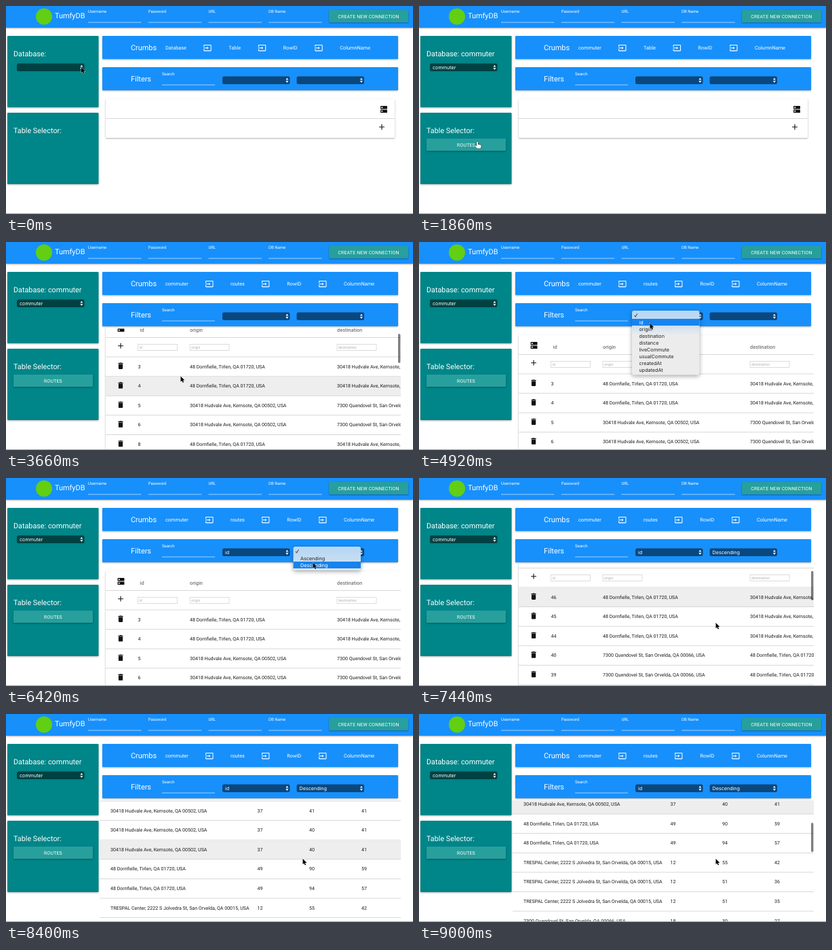
Write an HTML page that moves like this. It is 600 by 306 pixels and loops after 9060 ms.

```html
<!DOCTYPE html>
<html lang="en">
<head>
<meta charset="utf-8">
<title>Database browser</title>
<style>
  html, body { margin: 0; width: 100%; height: 100%; overflow: hidden; background: #fff; }
  svg { display: block; width: 100%; height: 100%; font-family: Roboto, sans-serif; text-rendering: geometricPrecision; }
  .card { filter: drop-shadow(0 1px 1px rgba(0, 0, 0, .32)); }
  .menu { filter: drop-shadow(0 2px 3px rgba(0, 0, 0, .35)); }
  .ui { font: 7.2px Inter, sans-serif; }
  .btn { font-size: 6.9px; letter-spacing: .2px; }
</style>
</head>
<body>
<svg id="stage" viewBox="0 0 600 306" xmlns="http://www.w3.org/2000/svg"></svg>
<script>
const LOOP = 9060, STEP = 60;
const BLUE = '#1790fc', TEAL = '#008588', BUTTON = '#279f9c';
const ROW_TOP = 194, ROW_HEIGHT = 28.6;

const ICONS = {
  enter: 'M21 3H3c-1.1 0-2 .9-2 2v4h2V5h18v14H3v-4H1v4c0 1.1.9 2 2 2h18c1.1 0 2-.9 2-2V5c0-1.1-.9-2-2-2zM11 16l4-4-4-4v3H1v2h10z',
  server: 'M4 3h16q1 0 1 1v6q0 1-1 1H4q-1 0-1-1V4q0-1 1-1zM4 13h16q1 0 1 1v6q0 1-1 1H4q-1 0-1-1v-6q0-1 1-1zM7 5a2 2 0 100 4 2 2 0 000-4zM7 15a2 2 0 100 4 2 2 0 000-4z',
  add: 'M19 13h-6v6h-2v-6H5v-2h6V5h2v6h6z',
  trash: 'M6 19c0 1.1.9 2 2 2h8c1.1 0 2-.9 2-2V7H6zM19 4h-3.5l-1-1h-5l-1 1H5v2h14z'
};
const ARROW = 'M0 0V8.2L1.9 6.5 3.2 9.4 4.6 8.8 3.3 6H5.9Z';
const HAND = 'M-1 .5Q0-.8 1 .5V3.5L5 4.4Q6 5 5.6 7L4.8 9.5H-.5L-3.6 6Q-3.5 4.6-2.2 5.2L-1 6.2Z';

const PLACES = {
  d: '48 Dornfielle, Tirlen, QA 01720, USA',
  h: '30418 Hudvale Ave, Kernsote, QA 00502, USA',
  q: '7300 Quendovel St, San Orvelda, QA 00066, USA',
  t: 'TRESPAL Center, 2222 S Jolvedra St, San Orvelda, QA 00015, USA'
};
// id, origin and destination keys, distance, live and usual commute
const parseRows = text => text.split(';').map(row => row.split(' '));
const ASCENDING = parseRows('3 dh 37 41 40;4 dh 37 42 40;5 hq 18 30 27;6 hq 18 31 27;8 dh 37 40 41;9 dh 37 43 41;10 hd 37 44 42');
const DESCENDING = parseRows('46 dh 37 41 41;45 dh 37 40 41;44 dh 37 40 41;40 qd 49 90 59;39 qd 49 94 57;38 qt 12 55 42;37 qt 12 51 36;36 qt 12 51 35;35 hq 18 30 27;34 hq 18 31 27');
const COLUMNS = { id: 194.5, origin: 271, destination: 488, distance: 704.5, liveCommute: 781, usualCommute: 858, createdAt: 935, updatedAt: 1012 };

// Keyframes: time, then values
const CURSOR = [
  [0, 111, 90], [300, 111, 90], [660, 62, 99], [1020, 62, 99], [1680, 86, 200], [2220, 86, 200],
  [2820, 257.5, 197.5], [3900, 257.5, 197.5], [4500, 352, 108], [4680, 352, 108], [4860, 340.5, 119.5],
  [5340, 340.5, 119.5], [5820, 470, 108], [6000, 470, 108], [6360, 452.5, 124.5], [6780, 452.5, 124.5], [7200, 437.5, 213]
];
const SCROLL_Y = [[3000, 0], [3300, 50], [3420, 50], [3900, 0], [7260, 0], [7620, 66], [8640, 66], [9000, 132.7]];
const SCROLL_X = [[7680, 0], [8378, 334]];
const BAR_ALPHA = [[2940, 0], [3060, .5], [3900, .5], [4140, 0], [7200, 0], [7320, .5], [7620, .5], [7920, .08], [8100, 0], [8580, 0], [8700, .5]];
const HOVER = [[0, -1], [2520, 0], [3360, 1], [3960, 0], [4140, -1], [7080, 0], [8400, 2]];

function track(keys, t) {
  const next = keys.findIndex(key => key[0] > t);
  if (next < 0) return keys[keys.length - 1].slice(1);
  if (next === 0) return keys[0].slice(1);
  const from = keys[next - 1], to = keys[next];
  const u = (t - from[0]) / (to[0] - from[0]), ease = u * u * (3 - 2 * u);
  return from.slice(1).map((value, i) => value + (to[i + 1] - value) * ease);
}
const stepAt = (keys, t) => keys.filter(key => key[0] <= t).pop()[1];

const rect = (x, y, w, h, fill, extra = '') => `<rect x="${x}" y="${y}" width="${w}" height="${h}" fill="${fill}" ${extra}/>`;
const text = (x, y, size, value, fill = '#fff', extra = '') => `<text x="${x}" y="${y}" font-size="${size}" fill="${fill}" ${extra}>${value}</text>`;
const uiText = (x, y, value, fill) => `<text class="ui" x="${x}" y="${y}" fill="${fill}">${value}</text>`;
const icon = (name, cx, cy, scale, fill = '#111') =>
  `<path fill="${fill}" fill-rule="evenodd" d="${ICONS[name]}" transform="translate(${cx} ${cy}) scale(${scale}) translate(-12 -12)"/>`;
const card = (x, y, w, h, fill) => rect(x, y, w, h, fill, 'rx="1" class="card"');

function button(x, y, w, label) {
  return card(x, y, w, 18, BUTTON) +
    `<text class="btn" x="${x + w / 2}" y="${y + 11.5}" fill="#fff" text-anchor="middle">${label}</text>`;
}

function field(x, y, w, label) {
  return text(x, y, 6, label) + rect(x, y + 14.2, w, .7, '#d8ecff');
}

function select(x, y, value) {
  return rect(x, y, 99.5, 11.5, 'rgba(0,0,0,.5)', 'rx="2.5"') + uiText(x + 4, y + 8.4, value, '#fff') +
    `<path fill="#fff" d="M${x + 93.4} ${y + 5}l2-2.8 2 2.8zM${x + 93.4} ${y + 6.6}l2 2.8 2-2.8z"/>`;
}

function menu(x, y, items, active, fill) {
  const rows = items.map((item, i) => {
    const top = y + 12 + i * 10, on = i === active;
    return (on ? rect(x, top, 99.5, 10, '#1683ee') : '') + uiText(x + 10.5, top + 7.6, item, on ? '#fff' : '#222');
  });
  return `<g>${rect(x, y, 99.5, 14.5 + items.length * 10, fill, 'rx="3" class="menu"')}` +
    `<path d="M${x + 3.5} ${y + 7}l1.5 2.2 2.8-4.8" fill="none" stroke="#222" stroke-width=".9"/>${rows.join('')}</g>`;
}

function table(rows, hover, sx, sy) {
  const line = y => rect(147, y - .4, 940, .8, '#cfcfcf');
  let out = rect(147, 137, 940, 900, '#fff', 'class="card"') + line(165.4) + line(ROW_TOP) +
    icon('server', 169.5, 152, .55) + icon('add', 169, 177.7, .56);
  for (const [name, x] of Object.entries(COLUMNS)) {
    out += text(name === 'id' ? 197.5 : x, 157.3, 7.4, name, '#757575', 'font-weight="500"') +
      rect(x, 175.5, 58, 9, '#fff', 'stroke="#d4d4d4" stroke-width=".8"') + text(x + 2, 182, 5.4, name, '#b0b0b0');
  }
  rows.forEach(([id, route, ...numbers], i) => {
    const y = ROW_TOP + i * ROW_HEIGHT, cells = [id, PLACES[route[0]], PLACES[route[1]], ...numbers];
    const xs = Object.values(COLUMNS);
    if (i === hover) out += rect(147, y, 940, ROW_HEIGHT, '#eee');
    out += line(y + ROW_HEIGHT) + icon('trash', 169, y + 13.2, .52) +
      cells.map((cell, c) => text(xs[c], y + 16.5, 7.07, cell, '#1c1c1c')).join('');
  });
  return `<g clip-path="url(#view)"><g transform="translate(${-sx} ${-sy})">${out}</g></g>`;
}

function emptyTable() {
  return card(147, 137, 426, 57, '#fff') + rect(147, 165, 426, .8, '#cfcfcf') +
    icon('server', 557, 152, .55) + icon('add', 554, 178, .56);
}

function crumbs(connected, loaded) {
  const first = connected ? 2.8 : 0, second = first + (loaded ? 3 : 0);
  const label = (x, value) => text(x, 63.7, 7.35, value);
  const arrow = x => icon('enter', x, 61.7, .52, '#fff');
  return card(142, 44, 436, 34, BLUE) + text(184, 65, 10.9, 'Crumbs') +
    label(235, connected ? 'commuter' : 'Database') + arrow(297 + first) +
    label(328.3 + first, loaded ? 'routes' : 'Table') + arrow(377.5 + second - (loaded ? .6 : 0)) +
    label(408.5 + second, 'RowID') + arrow(461 + second) + label(492.3 + second, 'ColumnName');
}

function draw(t) {
  const connected = t >= 1020, loaded = t >= 2160, sorted = t >= 6960;
  const [sy] = track(SCROLL_Y, t), [sx] = track(SCROLL_X, t), [alpha] = track(BAR_ALPHA, t);
  const [cx, cy] = track(CURSOR, t);
  const hand = t >= 1560 && t < 2340;

  let out = `<defs><clipPath id="view"><rect x="138" y="127" width="444" height="179"/></clipPath>
    <linearGradient id="tint" gradientUnits="userSpaceOnUse" x1="0" y1="108" x2="0" y2="137">
    <stop stop-color="#b9d8f3"/><stop offset=".45" stop-color="#c6def2"/><stop offset="1" stop-color="#ececec"/></linearGradient></defs>`;
  out += rect(0, 0, 600, 306, '#fff');

  out += loaded
    ? table(sorted ? DESCENDING : ASCENDING, stepAt(HOVER, t), sx, sy) +
      rect(578, 129.2 + .232 * sy, 3.4, 43, '#000', `rx="1.7" opacity="${alpha}"`)
    : emptyTable();

  out += card(0, -2, 600, 34, BLUE) + `<circle cx="56" cy="15.5" r="12" fill="#62cf12"/>` + text(72, 18, 10.9, 'TumfyDB') +
    ['Username', 'Password', 'URL', 'DB Name'].map((label, i) => field(121 + i * 88.7, 9.5, 78.5, label)).join('') +
    button(476, 6, 117, 'CREATE NEW CONNECTION');

  out += card(2, 44, 134.5, 105, TEAL) + text(11, 74, 10.8, 'Database:' + (connected ? ' commuter' : '')) +
    select(16, 84.5, connected ? 'commuter' : '') +
    card(2, 157, 134.5, 105, TEAL) + text(11, 187, 10.8, 'Table Selector:') +
    (connected ? button(11, 195, 117, 'ROUTES') : '');

  out += crumbs(connected, loaded) + card(142, 90, 436, 34, BLUE) + text(184, 111, 10.9, 'Filters') +
    field(230, 101.5, 78, 'Search') + select(319, 103.5, t >= 5340 ? 'id' : '') + select(428.5, 103.5, t >= 6780 ? 'Descending' : '');

  if (t >= 300 && t < 1020) out += menu(11, 82, ['commuter'], t >= 480 ? 0 : -1, '#cde1e0');
  if (t >= 4680 && t < 5340) out += menu(314, 101, Object.keys(COLUMNS), t >= 4800 ? 0 : -1, 'url(#tint)');
  if (t >= 5940 && t < 6780) out += menu(423.5, 101, ['Ascending', 'Descending'], t < 6120 ? -1 : t < 6300 ? 0 : 1, 'url(#tint)');

  out += rect(0, 305, 600, 1, '#a2a2a2');
  out += `<path d="${hand ? HAND : ARROW}" transform="translate(${cx} ${cy})" fill="${hand ? '#fff' : '#000'}"
    stroke="${hand ? '#000' : '#fff'}" stroke-width=".7" paint-order="stroke"/>`;
  return out;
}

const stage = document.getElementById('stage');
let shown = -1;
function frame() {
  const time = Math.floor(performance.now() % LOOP / STEP) * STEP;
  if (time !== shown) stage.innerHTML = draw(shown = time);
  requestAnimationFrame(frame);
}
frame();
</script>
</body>
</html>
```
